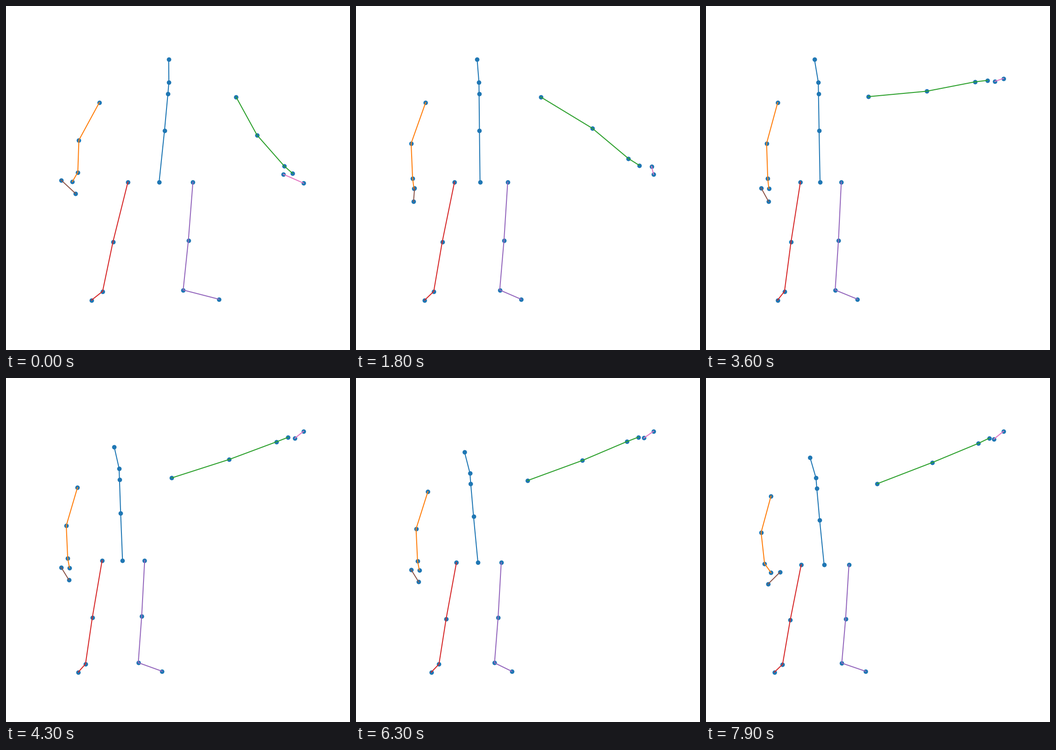
These frames come from a looping animation (748x748 px, 8 s). A matplotlib script:

```python
import numpy as np
import matplotlib.pyplot as plt
from matplotlib.animation import FuncAnimation

SIZE, DPI = 748, 100
FRAMES, INTERVAL = 80, 100
# Plot box that every pose is autoscaled to, y upwards
BOX_MIN = np.array([119.85, 108.46])
BOX_MAX = np.array([646.85, 632.06])
ASPECT = 1.5  # sideways stretch of the body units

# Control values of the body at a few moments (in frames)
KEYS = [0, 8, 28, 43, 55, 70, 79]
TRACKS = dict(
    lean=[15, -4, 0, -8, -20, -16, -17],       # torso, sideways
    sway=[-12, 1, -2, 1, 6.5, -4, 10.5],       # hanging arm
    upper=[-75.5, -79, -14, 25.5, 28, 32.5, 34],   # pointing arm, degrees
    fore=[-67.5, -109, -2, 29, 31, 37, 36],
    hand=[-62, -80, -15, 30, 29, 34, 40],
    reach=[0.92, 1.04, 0.98, 1.07, 1.04, 0.99, 1],
    left_thumb=[-22, 22, -18, -18, -20, -14, 25],
    right_thumb=[-14, 24, 22, 16, 15, 10, 10],
    foot=[92, 64, 90, 93, 61, 88, 87],
)


def bone(length, degrees):
    a = np.radians(degrees)
    return length * np.array([ASPECT * np.cos(a), np.sin(a)])


def body(frame):
    """Joints of each limb, measured from the middle of the hips."""
    c = {name: np.interp(frame, KEYS, track) for name, track in TRACKS.items()}
    lean, sway, reach = c["lean"], c["sway"], c["reach"]
    lift = (max(c["upper"], 0) / 34) ** 2
    tilt = -(c["upper"] + 78) / 9
    hips = 257 + 5 * lift

    spine = [(lean + tilt, 524), (lean, 474), (0.9 * lean, 448.5),
             (0.55 * lean, 368.5 + 3 * lift), (0, hips)]

    shoulder = np.array([0.6 * lean - 101, 430])
    hang = np.array([(0, 0), (0.6 * sway - 27, -89), (sway - 24, -165),
                     (2 * sway - 21, -187), (1.5 * sway - 22, -215)])
    hang = shoulder + min(reach, 1) * hang
    left_arm, left_tip = hang[:4], hang[4]
    left_hand = [left_tip + (c["left_thumb"], 29), left_tip]

    x = 107.5 + 13 * np.cos(np.radians(c["fore"])) + 0.4 * lean
    bones = [(x, 442 + 18 * lift), bone(93 * reach, c["upper"]),
             bone(79 * reach, c["fore"]), bone(20 * reach, c["hand"]),
             bone(26 * reach, c["hand"])]
    chain = np.cumsum(bones, axis=0)
    right_arm, right_tip = chain[:4], chain[4]
    right_hand = [chain[3] + (c["right_thumb"], -2), right_tip]

    left_leg = [(-48, hips), (-71, 127), (-87, 19), (-104, 0)]
    right_leg = [(52, hips), (45, 130), (37, 22), (c["foot"], 2)]
    return [np.array(part) for part in (spine, left_arm, right_arm, left_leg,
                                        right_leg, left_hand, right_hand)]


def pose(frame):
    """Limbs scaled so that the whole body fills the box."""
    limbs = body(frame)
    joints = np.concatenate(limbs)
    low, high = joints.min(axis=0), joints.max(axis=0)
    scale = (BOX_MAX - BOX_MIN) / (high - low)
    return [BOX_MIN + (part - low) * scale for part in limbs]


fig = plt.figure(figsize=(SIZE / DPI, SIZE / DPI), dpi=DPI, facecolor="white")
ax = fig.add_axes([0, 0, 1, 1])
ax.set(xlim=(0, SIZE), ylim=(0, SIZE))
ax.axis("off")

start = pose(0)
dots = ax.scatter(*np.concatenate(start).T, s=36, color="C0")
lines = [ax.plot(*part.T, lw=1.5, color=f"C{i}")[0]
         for i, part in enumerate(start)]


def update(frame):
    limbs = pose(frame)
    dots.set_offsets(np.concatenate(limbs))
    for line, part in zip(lines, limbs):
        line.set_data(*part.T)
    return [dots, *lines]


anim = FuncAnimation(fig, update, frames=FRAMES, interval=INTERVAL,
                     repeat=True, repeat_delay=0, blit=False)
plt.show()
```
